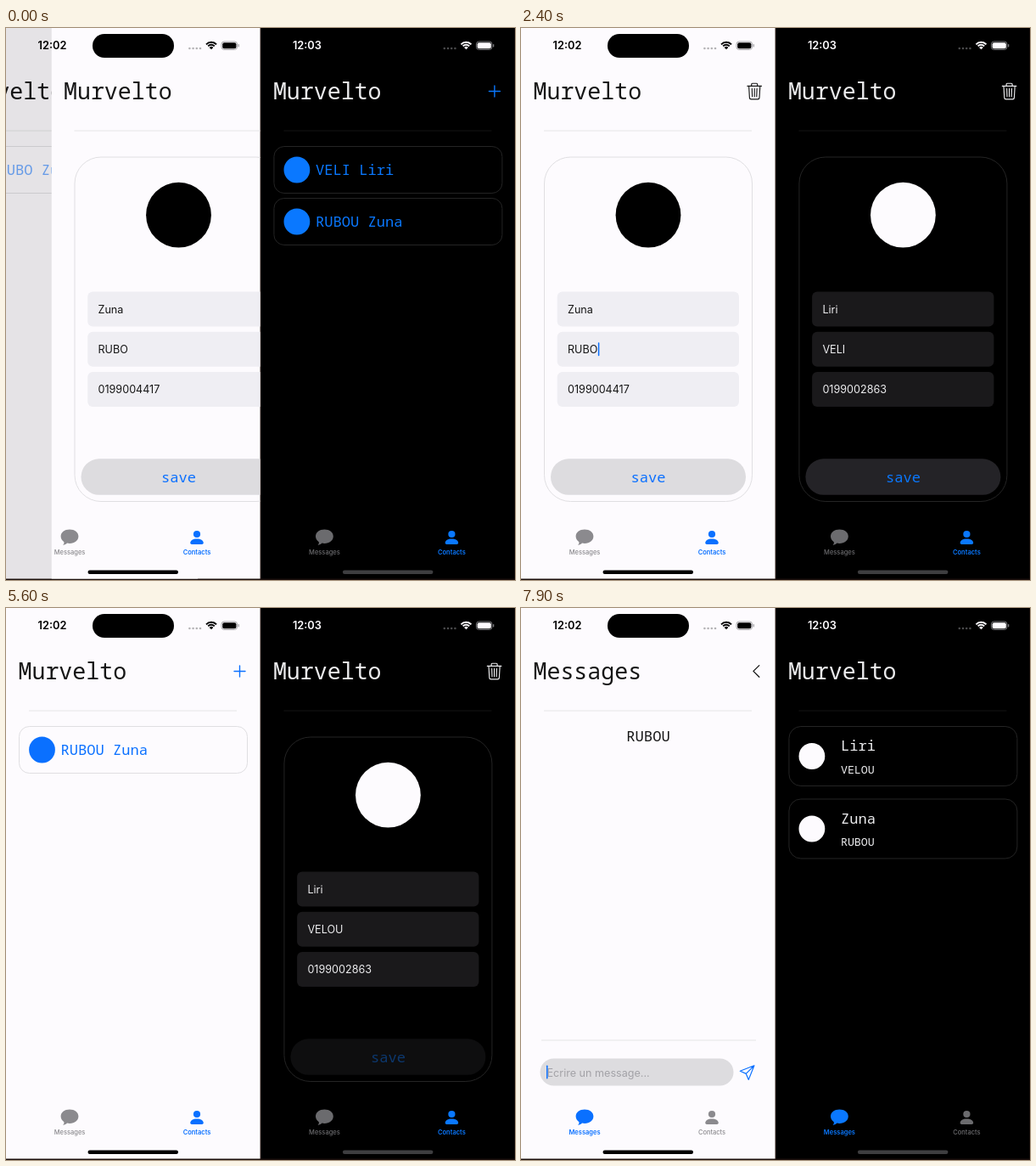
These frames come from a looping animation (600x650 px, 8 s). An HTML page with a canvas:

```html
<!DOCTYPE html>
<html lang="fr">
<head>
<meta charset="utf-8">
<title>Two phones</title>
<style>
html, body { margin: 0; width: 100%; height: 100%; overflow: hidden; background: #1c100c; }
canvas { display: block; width: 600px; height: 650px; }
</style>
</head>
<body>
<canvas id="stage"></canvas>
<script>
const canvas = document.getElementById('stage');
const dpr = window.devicePixelRatio || 1;
canvas.width = 600 * dpr;
canvas.height = 650 * dpr;
const c = canvas.getContext('2d');

const LOOP = 8000, STEP = 100;
const APP = 'Murvelto';
const MONO = '"Noto Sans Mono", "DejaVu Sans Mono", monospace';
const SANS = 'Inter, Roboto, sans-serif';

const light = {
  bg: '#fdfbfe', ink: '#000', text: '#161616', blue: '#0a70ff', gray: '#8b8a8e',
  line: '#e6e5e8', card: '#e0dfe2', field: '#efeef3', pill: '#dddcdf',
  home: '#000', dots: '#b4b3b6', nub: '#a5a4a8', clock: '12:02', island: true
};
const dark = {
  bg: '#000', ink: '#fdfbfe', text: '#ececee', blue: '#0a78ff', gray: '#6b6b6e',
  line: '#151515', card: '#242424', field: '#1a191b', pill: '#242327',
  home: '#3e3e40', dots: '#4a4a4c', nub: '#77777a', clock: '12:03', island: false
};
let th = light;

function text(s, x, y, size, color, { font = MONO, weight = 400, align = 'left' } = {}) {
  c.font = `${weight} ${size}px ${font}`;
  c.textAlign = align;
  c.fillStyle = color;
  c.fillText(s, x, y);
}

function box(x, y, w, h, r, fill, stroke) {
  c.beginPath();
  c.roundRect(x, y, w, h, r);
  if (fill) { c.fillStyle = fill; c.fill(); }
  if (stroke) { c.strokeStyle = stroke; c.lineWidth = 1; c.stroke(); }
}

function disc(x, y, r, color) {
  c.beginPath();
  c.arc(x, y, r, 0, 7);
  c.fillStyle = color;
  c.fill();
}

function path(d, x, y, color, width) {
  c.save();
  c.translate(x, y);
  c.strokeStyle = color;
  c.lineWidth = width;
  c.lineCap = c.lineJoin = 'round';
  c.stroke(new Path2D(d));
  c.restore();
}

function faded(alpha, draw) {
  c.save();
  c.globalAlpha *= alpha;
  draw();
  c.restore();
}

function rule(x0, x1, y) {
  c.fillStyle = th.line;
  c.fillRect(x0, y - .5, x1 - x0, 1);
}

function caret(x, y, alpha) {
  if (alpha > 0) faded(alpha, () => box(x, y, 1.5, 16, .7, th.blue));
}

function header(title) {
  c.fillStyle = th.bg;
  c.fillRect(0, 0, 300, 650);
  text(title, 14.5, 84, 26.6, th.text, { weight: 300 });
  rule(27, 272, 121);
}

// Pages

function contacts(names, pressed) {
  header(APP);
  path('M-6.5 0H6.5M0-6.5V6.5', 275.5, 74.5, th.blue, 1.4);
  names.forEach((name, i) => {
    const y = 139.5 + i * 61;
    box(15.5, y, 269, 55, 12, null, th.card);
    faded(i === 0 && pressed ? .58 : 1, () => {
      disc(42.5, y + 27.5, 15.4, th.blue);
      text(name, 64.5, y + 33.5, 17.1, th.blue);
    });
  });
}

function chats(rows, pressed) {
  header(APP);
  rows.forEach(([first, last], i) => {
    const y = 139.5 + i * 85.5;
    box(15.5, y, 269, 70, 14, null, th.card);
    faded(i === 0 && pressed ? .6 : 1, () => {
      disc(42.5, y + 35, 15.4, th.ink);
      text(first, 76.5, y + 28.5, 17.1, th.text);
      text(last, 76.5, y + 55, 13.3, th.text);
    });
  });
}

function detail({ first, last, phone, cursor, pressed }) {
  header(APP);
  path('M-8.3-6.3H8.3M-3.5-6.3V-8.4Q-3.5-9.4-2.5-9.4H2.5Q3.5-9.4 3.5-8.4V-6.3' +
    'M-6.6-6.3L-5.8 7.5Q-5.7 9.2-4 9.2H4Q5.7 9.2 5.8 7.5L6.6-6.3' +
    'M-2.9-3.2L-2.6 6.2M0-3.2V6.2M2.9-3.2L2.6 6.2', 275.2, 74.6, th.text, 1.15);
  box(27.5, 152, 245, 405.5, 31, null, th.card);
  disc(150, 220.2, 38.4, th.ink);
  [first, last, phone].forEach((s, i) => {
    const y = 310.5 + i * 47.3;
    box(42.7, y, 214.3, 41, 6, th.field);
    text(s, 55, y + 25.2, 12.6, th.text, { font: SANS });
    if (i === 1) caret(55.5 + c.measureText(s).width, y + 12.5, cursor);
  });
  faded(pressed ? .4 : 1, () => {
    box(35, 507.3, 230, 42.5, 21.2, th.pill);
    text('save', 150, 535, 17.1, th.blue, { align: 'center' });
  });
}

function chat(message, cursor) {
  header('Messages');
  path('M3.3-6.8L-3.6 0L3.3 6.8', 277.5, 74.4, th.text, 1.3);
  text(message, 150, 156.5, 17.1, th.text, { align: 'center' });
  rule(24, 277, 509);
  box(22.5, 530.5, 228, 32, 16, th.pill);
  text('Ecrire un message...', 30.5, 551.5, 12.6, '#a3a2a7', { font: SANS });
  caret(30, 538.5, cursor);
  path('M8.6-8L-8-1.6L-1 1.6L2 8.6ZM-1 1.6L8.6-8', 266.3, 546.8, th.blue, 1.2);
}

// Fixed bars

function statusBar() {
  if (th.island) box(102, 7, 96, 28, 14, '#000');
  text(th.clock, 37.5, 25.3, 12.8, th.ink, { font: SANS, weight: 600 });
  for (let i = 0; i < 4; i++) disc(216.4 + i * 4.2, 24, 1.3, th.dots);
  c.strokeStyle = th.ink;
  c.lineCap = 'butt';
  c.lineWidth = 1.9;
  for (const r of [5.2, 8.2]) {
    c.beginPath();
    c.arc(242, 25, r, -Math.PI * .76, -Math.PI * .24);
    c.stroke();
  }
  c.beginPath();
  c.moveTo(242, 25.2);
  c.arc(242, 25.2, 3.2, -Math.PI * .76, -Math.PI * .24);
  c.fillStyle = th.ink;
  c.fill();
  box(254, 16, 18.5, 9.4, 3, null, th.nub);
  box(255.2, 17.2, 16.2, 7, 2, th.ink);
  box(273.6, 19, 1.3, 3.4, .6, th.nub);
}

function tabBar(onMessages) {
  const a = onMessages ? th.blue : th.gray, b = onMessages ? th.gray : th.blue;
  c.fillStyle = a;
  c.fill(new Path2D('M64.6 598.6C64.6 593.6 69 590.4 75 590.4S85.4 593.6 85.4 598.6S81 607 75 607' +
    'C73.8 607 73 606.9 72 606.6C70.8 607.9 69 609 67.2 608.9C68.3 607.8 68.6 606.6 68.4 605.2C66 603.7 64.6 601.4 64.6 598.6Z'));
  disc(225, 596, 4.1, b);
  c.fill(new Path2D('M217.3 606.2C217.3 603.4 220.5 601.4 225 601.4S232.7 603.4 232.7 606.2Q232.7 608 231 608H219Q217.3 608 217.3 606.2Z'));
  const label = (s, x, color) =>
    text(s, x, 620, 7.5, color, { font: SANS, weight: color === th.blue ? 600 : 500, align: 'center' });
  label('Messages', 75, a);
  label('Contacts', 225, b);
  box(96.5, 638.6, 106.5, 4.4, 2.2, th.home);
}

// Motion

function spring(t, start) {
  const x = Math.max(0, (t - start) * .0114);
  const p = 1 - (1 + x) * Math.exp(-x);
  return p > .998 ? 1 : p;
}

function slide(under, over, p) {
  if (p < 1) {
    c.save();
    c.translate(-90 * p, 0);
    under();
    c.restore();
    c.fillStyle = `rgba(0,0,0,${.115 * p})`;
    c.fillRect(0, 0, 300, 650);
  }
  if (p > 0) {
    c.save();
    c.translate(300 * (1 - p), 0);
    c.beginPath();
    c.rect(0, 0, 300, 650);
    c.clip();
    over();
    c.restore();
  }
}

// Caret opacity: solid, fades out, comes back; restarts at each key
function blink(t, from, to, ...keys) {
  if (t < from || t >= to) return 0;
  const last = Math.max(from, ...keys.filter(k => k <= t));
  const ph = (t - last) % 1000;
  return ph < 600 ? 1 : ph < 800 ? (800 - ph) / 170 : ph < 900 ? 0 : .6;
}

function leftPhone(t) {
  const typed = t >= 3300 ? 'RUBOU' : 'RUBO';
  const card = () => detail({
    first: 'Zuna', last: typed, phone: '0199004417',
    cursor: blink(t, 2200, 4300, 3300), pressed: t >= 4300
  });
  if (t < 6000) {
    const p = t < 4500 ? spring(t, -276) : 1 - spring(t, 4500);
    slide(() => contacts([typed + ' Zuna'], t < 4500), card, p);
  } else {
    slide(() => chats([['Zuna', 'RUBOU']], t >= 6400),
      () => chat('RUBOU', blink(t, 7600, LOOP)), spring(t, 6596));
  }
  statusBar();
  tabBar(t >= 6000);
}

function rightPhone(t) {
  const typed = t < 3300 ? 'VELI' : t < 4600 ? 'VEL' : t < 4900 ? 'VELO' : 'VELOU';
  const card = () => detail({
    first: 'Liri', last: typed, phone: '0199002863',
    cursor: blink(t, 2800, 5400, 3300, 4600, 4900), pressed: t >= 5500
  });
  if (t < 7000) {
    const p = t < 5700 ? spring(t, 1282) : 1 - spring(t, 5700);
    slide(() => contacts([typed + ' Liri', 'RUBOU Zuna'], t >= 1100 && t < 5700), card, p);
  } else {
    chats([['Liri', 'VELOU'], ['Zuna', 'RUBOU']]);
  }
  statusBar();
  tabBar(t >= 7000);
}

function phone(theme, x, clipX, clipW, draw, t) {
  th = theme;
  c.save();
  c.beginPath();
  c.rect(clipX, 0, clipW, 648.5);
  c.clip();
  c.translate(x, 0);
  draw(t);
  c.restore();
}

const begin = performance.now();
function frame() {
  const now = performance.now() - begin;
  const t = Math.floor((now + 15) / STEP) * STEP % LOOP;
  c.setTransform(dpr, 0, 0, dpr, 0, 0);
  c.fillStyle = '#1c100c';
  c.fillRect(0, 0, 600, 650);
  phone(light, 0, 0, 299.6, leftPhone, t);
  phone(dark, 300.4, 301, 298.4, rightPhone, t);
  requestAnimationFrame(frame);
}
frame();
</script>
</body>
</html>
```
